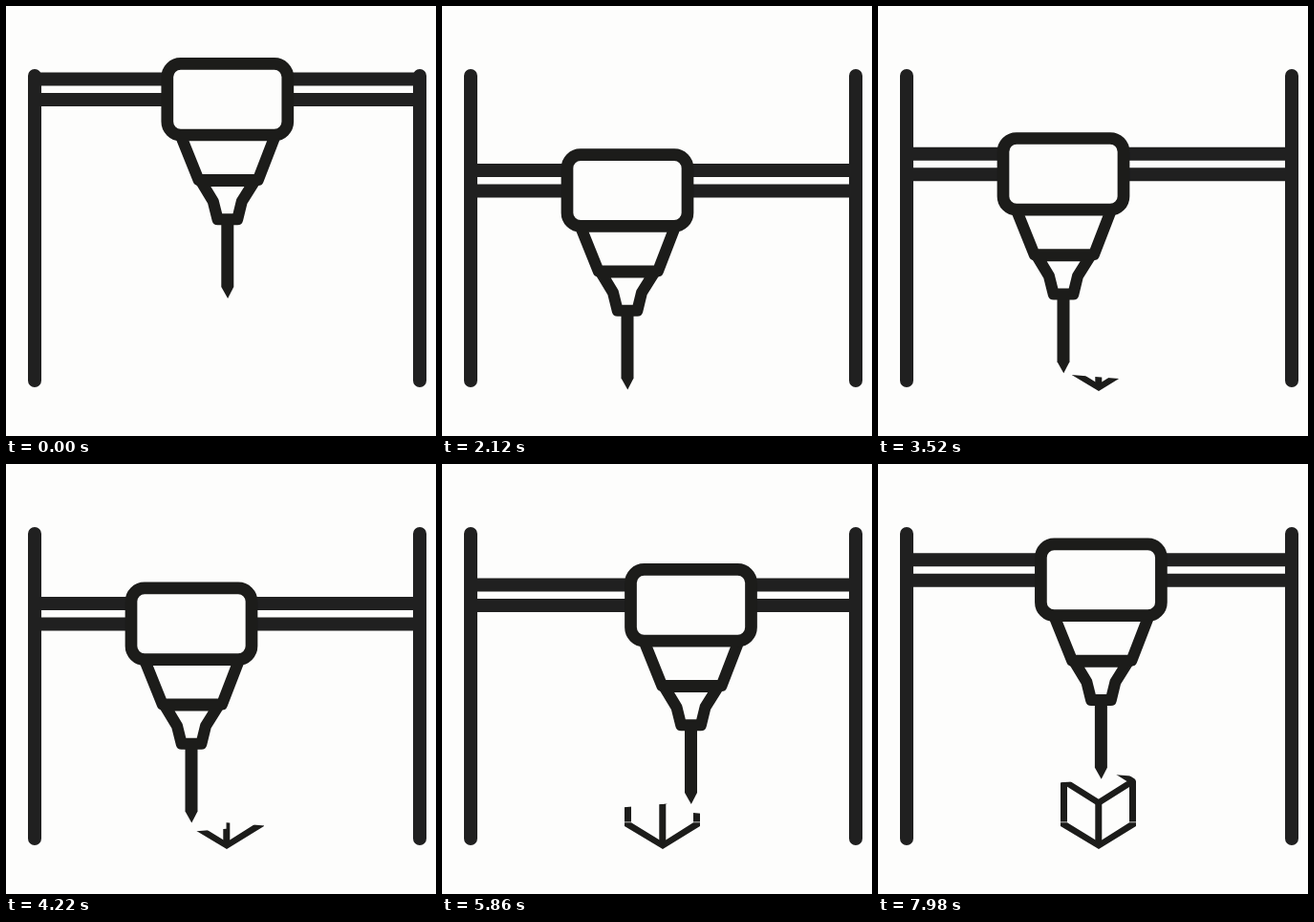
Recreate the animation shown at these times as an HTML page. Size 450 by 450 pixels, loop 8 s.

```html
<!DOCTYPE html>
<html lang="en">
<head>
<meta charset="utf-8">
<title>3D printer</title>
<style>
  html, body { margin: 0; width: 100%; height: 100%; overflow: hidden; background: #fdfdfc; }
  svg { display: block; width: 100%; height: 100%; }
  .line { fill: none; stroke: #1c1c1a; stroke-linejoin: round; }
  .solid { fill: #1c1c1a; }
  .frame { stroke: #202020; }
  .paper { fill: #fdfdfc; }
</style>
</head>
<body>
<svg viewBox="0 0 450 450">
  <defs>
    <clipPath id="printed"><polygon id="layers"/></clipPath>
  </defs>

  <g clip-path="url(#printed)">
    <path class="solid" d="M191 375.3H198L231 395.5L263 375.3H270V379L231 403L191 379Z"/>
    <path class="line" stroke-width="7" d="M194.5 332V374.4M266.5 332V374.4M230.8 354V398"/>
    <path class="line" stroke-width="6.5" d="M195 332L230.8 354.5L266.5 332L230.8 309.5Z"/>
  </g>

  <path class="line frame" stroke-width="14" stroke-linecap="round" d="M30 73V392M433 73V392"/>
  <path id="rails" class="line frame" stroke-width="14" d="M30 76.5H433M30 98H433"/>

  <!-- The head is drawn around x = 0, at its topmost height. -->
  <g id="head">
    <path class="line paper" stroke-width="12" d="M-48 138L-30.3 182H32L49 138"/>
    <path class="line paper" stroke-width="12"
          d="M-28 183L-15 204.5L-10.3 223.3H10.4L15 204.5L28.5 183Z"/>
    <path class="solid" d="M-6.5 224H6.5V294L.3 306L-6.5 294Z"/>
    <rect class="line paper" x="-63" y="60.3" width="126" height="74.7" rx="14" stroke-width="12.7"/>
  </g>
</svg>
<script>
  const LOOP = 8000;
  const CYCLE = 140;            // one left-right shake of the head
  const STEP = CYCLE / 3;       // mean length of a pose
  const POSES = [               // start within the cycle, head x
    { at: 0, x: 231.8 },
    { at: 20, x: 194 },
    { at: 120, x: 260.5 }
  ];
  const CENTRE_DRIFT = 1.6;     // the first pose slides right over the loop
  const LANDING = 1660, RISE_SPEED = 0.0123;
  const ROW = { left: 190, right: 271, time: STEP * 10, height: 6.44, start: 3547, y: 385 };

  const byId = id => document.getElementById(id);
  const head = byId('head'), rails = byId('rails'), layers = byId('layers');

  const rising = time => 95.4 - RISE_SPEED * (time - 2147);

  function headDrop(time) {
    if (time >= LANDING) return rising(time);
    return rising(LANDING) * (1 - Math.cos(Math.PI * time / LANDING)) / 2;
  }

  // Printed area: everything below a zigzag of slanted rows, up to the moving pen.
  function printedArea(time) {
    const progress = (time - ROW.start) / ROW.time;
    const row = Math.floor(progress), part = progress - row;
    const goesRight = row % 2 === 0;
    const from = goesRight ? ROW.left : ROW.right;
    const to = goesRight ? ROW.right : ROW.left;
    const pen = from + (to - from) * part;
    const y = ROW.y - ROW.height * row;
    return [
      [from, 450],
      [from, y],
      [pen, y - ROW.height * part],
      [pen, y + ROW.height * part],
      [to, y + ROW.height],
      [to, 450]
    ].map(point => point.join()).join(' ');
  }

  function draw(now) {
    const t = now % LOOP;
    const cycle = Math.floor(t / CYCLE);
    const pose = POSES.findLastIndex(p => t - cycle * CYCLE >= p.at);
    const time = (cycle * 3 + pose) * STEP;
    const drop = headDrop(time);
    const x = POSES[pose].x + (pose === 0 ? CENTRE_DRIFT * time / LOOP : 0);

    head.setAttribute('transform', `translate(${x} ${drop})`);
    rails.setAttribute('transform', `translate(0 ${drop})`);
    layers.setAttribute('points', printedArea(time));
  }

  const begin = performance.now();
  function tick() {
    draw(performance.now() - begin);
    requestAnimationFrame(tick);
  }
  tick();
</script>
</body>
</html>
```
